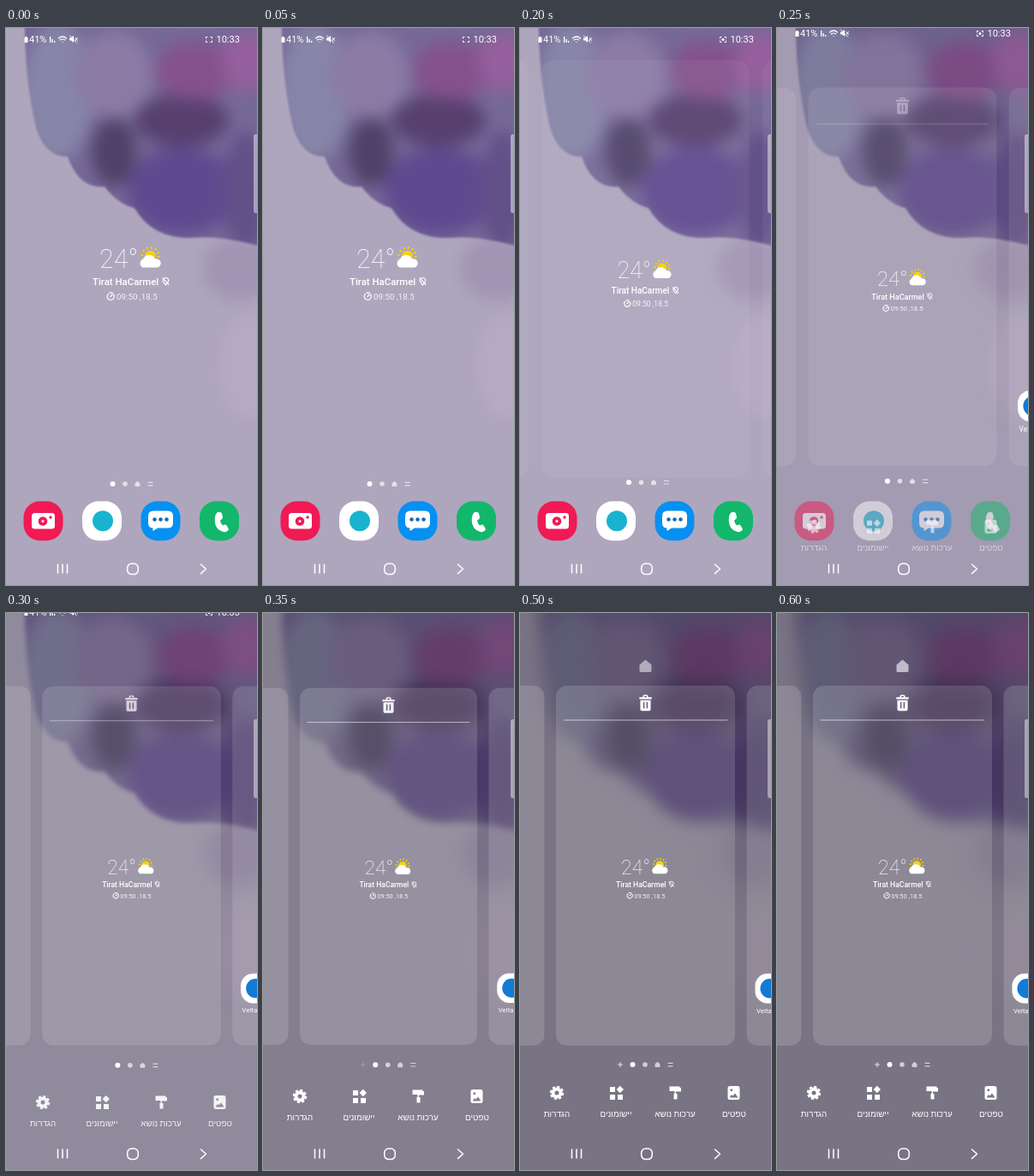
An HTML page that plays this animation: 293 by 650 pixels, repeating every 2400 ms.

```html
<!DOCTYPE html>
<html lang="he">
<head>
<meta charset="utf-8">
<title>Home screen edit mode</title>
<style>
  html, body { margin: 0; height: 100%; overflow: hidden; background: #aea6bd; }
  svg { display: block; width: 100vw; height: 100vh; font-family: Roboto, "Noto Sans", sans-serif; }
  .line { fill: none; stroke: #fff; stroke-linecap: round; stroke-linejoin: round; }
  .soft { filter: blur(9px); }
  .labels { font: 9.8px "Open Sans", "Noto Sans", sans-serif; text-anchor: middle; }
</style>
</head>
<body>
<svg viewBox="0 0 293 650" fill="#fff">
  <defs>
    <path id="house" d="M0-7.5 7-1.5V5.5Q7 7 5.5 7H-5.5Q-7 7-7 5.5V-1.5Z"/>
    <rect id="tile" x="-23" y="-23" width="46" height="46" rx="19"/>
    <rect id="card" x="8.5" y="-10.5" width="276" height="555" rx="17"/>
    <path id="bouquet" d="M22-30Q20 50 35 115 45 150 72 150 85 188 115 185 130 205 150 210 170 245 215 245 260 240 330 265V-30z"/>
    <clipPath id="edge"><use href="#bouquet"/></clipPath>
  </defs>

  <rect width="293" height="650" fill="#aea6bd"/>
  <g id="wallpaper">
    <g class="soft" fill="#b6aac3">
      <ellipse cx="272" cy="280" rx="42" ry="38" fill="#a094b3"/>
      <ellipse cx="284" cy="395" rx="34" ry="60"/>
    </g>
    <use href="#bouquet" fill="#766998"/>
    <g clip-path="url(#edge)">
      <g class="soft">
        <ellipse cx="60" cy="75" rx="42" ry="80" fill="#8785a8"/>
        <ellipse cx="125" cy="55" rx="46" ry="50" fill="#8b7ba5"/>
        <ellipse cx="126" cy="145" rx="26" ry="40" fill="#4e4268"/>
        <ellipse cx="205" cy="108" rx="55" ry="30" fill="#57406f"/>
        <ellipse cx="220" cy="50" rx="45" ry="34" fill="#85518d"/>
        <ellipse cx="280" cy="40" rx="28" ry="35" fill="#965f9d"/>
        <ellipse cx="205" cy="190" rx="64" ry="52" fill="#604a8f"/>
        <ellipse cx="280" cy="190" rx="26" ry="70" fill="#625088"/>
      </g>
    </g>
  </g>
  <rect id="dim" width="293" height="650" fill="#000"/>

  <g id="status" font-size="11">
    <path d="M21.5 11h1v-1h2v1h1v6h-4z"/>
    <text x="27" y="17.2">41%</text>
    <path d="M51 10h1.3v7H51zM53.5 13h1.3v4h-1.3zM56 15h1.3v2H56z"/>
    <path class="line" stroke-width="1.2" d="M61.5 12Q66 8 70.5 12M63.3 14Q66 12 68.7 14M66 16.5h.1"/>
    <path d="M74 11.5h2l3-2.5v8l-3-2.5h-2z"/>
    <path class="line" d="M74.5 9l8 8M81 11.5l2.5 3M83.5 11.5l-2.5 3"/>
    <path class="line" d="M233.5 12v-1.5h1.5M239 10.5h1.5V12M240.5 15v1.5H239M235 16.5h-1.5V15"/>
    <circle id="recordDot" cx="237" cy="13.5" r="1.6"/>
    <text x="245.5" y="17.2">10:33</text>
  </g>

  <g id="pages">
    <g id="cards">
      <use href="#card" x="-294"/><use href="#card"/><use href="#card" x="294"/>
    </g>
    <g id="trash">
      <path fill-rule="evenodd" d="M137 7.5h5.5V6Q142.5 4 144.5 4h4Q150.5 4 150.5 6v1.5H156V10.5H137zM144.5 7.5h4V6h-4zM138.5 12h16V26Q154.5 28.5 152 28.5H141Q138.5 28.5 138.5 26zM143 15v9.5h2V15zM148 15v9.5h2V15z"/>
      <path d="M20 42.3h253v1.2H20z" opacity=".6"/>
    </g>
    <text x="109" y="280" font-size="30.5" font-weight="200">24°</text>
    <circle cx="168.5" cy="266" r="6.3" fill="#f5d20c"/>
    <circle cx="168.5" cy="266" r="9.7" fill="none" stroke="#f5d20c" stroke-width="2.8" stroke-dasharray="1.9 3.18"/>
    <path d="M160 279.5a5 5 0 0 1 0-9.5 7.5 7.5 0 0 1 14-.5 5.2 5.2 0 0 1 3 10z"/>
    <text x="101" y="300" font-size="11.4" font-weight="500">Tirat HaCarmel</text>
    <path class="line" d="M186.5 299.8Q183.3 296 183.3 294.7a3.2 3.2 0 0 1 6.4 0Q189.7 296 186.5 299.8zM183 291.8l7 7.5" stroke-width="1.2"/>
    <g opacity=".88">
      <path class="line" d="M119.5 310.5A4 4 0 1 0 125.5 311M122 313.5l2-2.5M121 309h3.5" stroke-width="1.5"/>
      <text x="129" y="317" font-size="9.8">09:50 ,18.5</text>
    </g>
    <use href="#tile" x="338.5" y="456.5"/>
    <circle cx="338.5" cy="456.5" r="15" fill="#137ad6"/>
    <text x="317.5" y="494" font-size="10.5">Veltamor</text>
  </g>

  <use id="home" href="#house" x="146.5" y="62"/>
  <path d="M293 124h-1.5Q289 124 289 127V213Q289 216 291.5 216H293z" opacity=".45"/>

  <g id="dots">
    <path id="plus" class="line" d="M107.5 532h5M110 529.5v5" stroke-width="1.2"/>
    <circle cx="124.5" cy="532" r="3"/>
    <g opacity=".65">
      <circle cx="139" cy="532" r="2.8"/>
      <use href="#house" transform="translate(153.5 532) scale(.42)"/>
      <path d="M165.5 529.7h6v1.2h-6zM165.5 533.2h6v1.2h-6z"/>
    </g>
  </g>

  <g id="dock">
    <use href="#tile" x="43.5" y="575.3" fill="#f01a55"/>
    <rect x="30" y="566" width="27" height="18.5" rx="3.5"/>
    <circle cx="43" cy="575.5" r="5.3" fill="#f01a55"/>
    <circle cx="43" cy="575.5" r="1.5"/>
    <circle cx="52" cy="571" r="1.7" fill="#f01a55"/>
    <use href="#tile" x="112" y="575.3"/>
    <circle cx="113" cy="575.3" r="12" fill="#19b3cf"/>
    <use href="#tile" x="180.5" y="575.3" fill="#0690f2"/>
    <path d="M172 563.5h17q6 0 6 6v8q0 6-6 6h-12l-5.5 3.5v-3.5q-5.500 0-5.500-6v-8q0-6 6-6z"/>
    <path d="M173.500 573.500h.01M180.500 573.500h.01M187.500 573.500h.01" stroke="#1268b8" stroke-width="4.600" stroke-linecap="round"/>
    <use href="#tile" x="249" y="575.3" fill="#12b76b"/>
    <path d="M247 565h3q1.500 0 2 1.500l1 4.500q0 1.500-1.500 2.500l-1.500 1q.5 4 3 6l2-.8q1.500-.5 2.500.8l2 3.500q.8 1.800-.8 2.800-2 1.800-5 1.200-10-2.500-10-13.500 0-7 3.300-9.500z"/>
  </g>

  <g id="tools">
    <g fill="none" stroke="#fff">
      <circle cx="43" cy="560" r="4.5" stroke-width="4"/>
      <circle cx="43" cy="560" r="7" stroke-width="2.4" stroke-dasharray="3.1 2.398"/>
    </g>
    <path d="M105 553h6v6h-6zM105 562h6v6h-6zM114 562h6v6h-6zM116.800 551.800l4.200 4.200-4.200 4.200-4.200-4.200z"/>
    <path d="M174.5 552.5h12V554H188v4.500h-6v2.500h1.500v6.500h-4V561h1v-3h-6z"/>
    <path fill-rule="evenodd" d="M245 552h9q2.500 0 2.500 2.500v11q0 2.500-2.500 2.500h-9q-2.500 0-2.500-2.500v-11q0-2.500 2.500-2.500zM244.500 565.500h10l-3.500-5-2.500 3-1.500-1.500zM245.500 555.500v2.500h2.500v-2.500z"/>
    <g class="labels">
      <text x="43" y="588">הגדרות</text>
      <text x="112" y="588">יישומונים</text>
      <text x="181" y="588">ערכות נושא</text>
      <text x="250" y="588">טפטים</text>
    </g>
  </g>

  <g class="line" stroke-width="1.5">
    <path d="M60.5 626v10M66 626v10M71.5 626v10M227.5 626l6 5.300-6 5.300"/>
    <rect x="141.700" y="625" width="12.600" height="12.600" rx="5"/>
  </g>
</svg>
<script>
const LOOP = 2400, STEP = 50;
const el = id => document.getElementById(id);
const fade = (id, opacity) => el(id).setAttribute('opacity', opacity);
const move = (id, x, y) => el(id).setAttribute('transform', `translate(${x} ${y})`);

function draw() {
  const t = Math.floor(performance.now() % LOOP / STEP) * STEP;
  const ramp = (from, to) => Math.min(1, Math.max(0, (t - from) / (to - from)));
  const easeOut = (from, to) => 1 - (1 - ramp(from, to)) ** 2;

  // Pages shrink, then settle slightly larger
  const zoom = 1 - .25 * easeOut(150, 325) + .007 * ramp(400, 500);
  el('pages').setAttribute('transform', `translate(146.5 381) scale(${zoom}) translate(-146.5 -381)`);
  fade('cards', .15 * easeOut(150, 400));
  fade('trash', easeOut(215, 400));
  fade('home', .6 * easeOut(350, 600));

  el('wallpaper').style.filter = `blur(${1 + 8 * ramp(250, 500)}px)`;
  fade('dim', .3 * easeOut(225, 450));

  fade('recordDot', t < 100 ? 0 : 1);
  move('status', 0, -28 * ramp(200, 400));

  const shift = easeOut(150, 400);
  move('dots', 7 * shift, -5 * shift);
  fade('plus', .75 * ramp(300, 500));

  fade('dock', 1 - ramp(200, 300));
  fade('tools', easeOut(200, 350));
  move('tools', 0, 36 * (1 - easeOut(200, 425)));
  requestAnimationFrame(draw);
}
draw();
</script>
</body>
</html>
```
